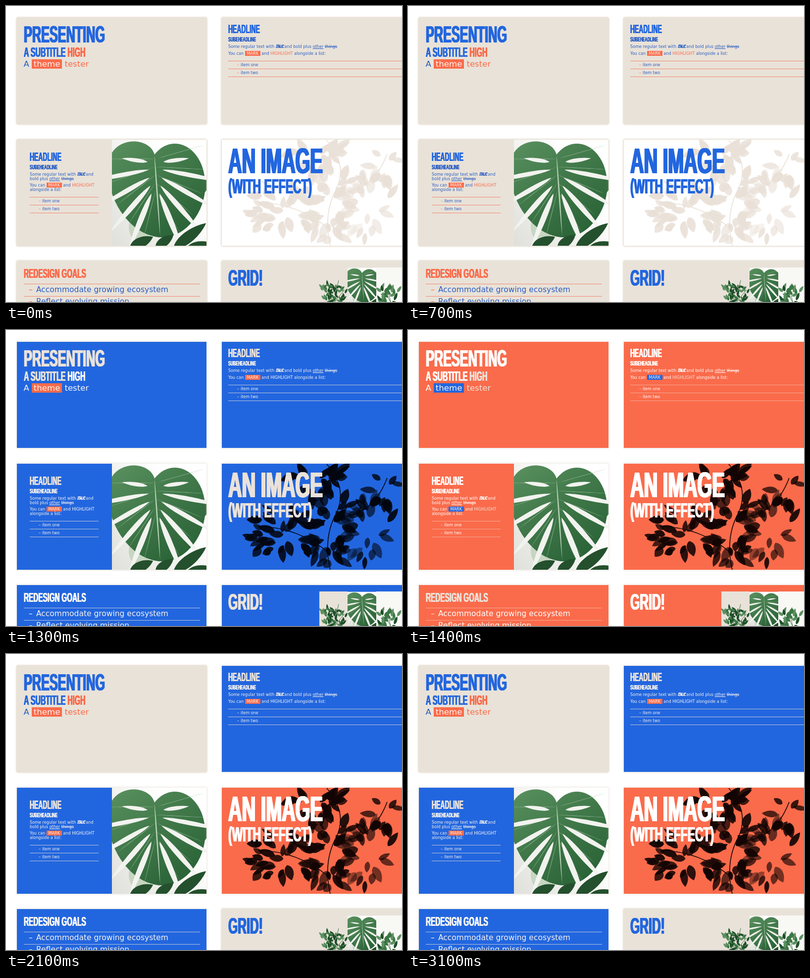
Animation, 800 px wide and 600 px high, one loop 3200 ms. Source, as an HTML page:

```html
<!DOCTYPE html>
<html lang="en">
<head>
<meta charset="utf-8">
<title>Theme tester</title>
<style>
html, body { margin: 0; width: 100%; height: 100%; overflow: hidden; background: #fff; }
body { position: relative; }
section, section > *, svg { position: absolute; }
section { left: 0; top: 0; }
svg { left: 0; top: 0; }

.beige {
  --bg: #e9e2d8; --head: #2266df; --accent: #fa6b4b; --text: #2b5fc4; --mark: #fa6b4b;
  --rule: #f08a72; --art: #fff; --leaf: #e9e0d7; --round: 3px;
  --shadow: 0 0 0 2px #ebe5dc, 0 0 4px 1px #e9e3da;
}
.blue {
  --bg: #2266df; --head: #ebe2d9; --accent: #fbf8f5; --text: #f6f1ec; --mark: #fa6b4b;
  --rule: #b9c4da; --art: #2266df; --leaf: #03060f; --round: 0;
  --shadow: 0 0 4px 1px #ebe6df;
}
.coral {
  --bg: #fa6b4b; --head: #fff; --accent: #ebe2d9; --text: #fff; --mark: #2266df;
  --rule: #f6a891; --art: #fa6b4b; --leaf: #120504; --round: 0;
  --shadow: 0 0 4px 1px #ebe6df;
}
.card { background: var(--bg); border-radius: var(--round); box-shadow: var(--shadow); }
.art { background: var(--art); }
.rule { background: var(--rule); height: 1px; }
.sprig { fill: var(--leaf); stroke: var(--leaf); }

.head, .text { white-space: pre; line-height: 1; }
.head, i {
  font-family: "Liberation Sans", Arial, sans-serif; font-weight: 700;
  transform: scaleX(.53); transform-origin: 0 0;
  text-shadow: .035em 0 currentColor, -.035em 0 currentColor;
}
.head { color: var(--head); }
.text { font-family: "DejaVu Sans", Verdana, sans-serif; color: var(--text); }
.plain { color: var(--text); }
.accent, b { color: var(--accent); }
.text b { font-weight: 400; }
i {
  display: inline-block; width: 15px; font-size: 9.4px; line-height: .8; font-style: normal;
  transform: scaleX(.53) skewX(-20deg); transform-origin: 0 100%;
}
mark { background: var(--mark); color: #fff5ee; padding: 0 3.7px; }
</style>
</head>
<body>
<script>
const LOOP = 3200;
const acts = [
  { until: 800, theme: 'beige' },
  { until: 1400, theme: 'blue' },
  { until: 2100, theme: 'coral' },
  { until: LOOP, theme: null } // every panel in its own theme
];

let seed = 11;
const random = () => (seed = (seed * 16807) % 2147483647) / 2147483647;
const between = (a, b) => a + random() * (b - a);
const repeat = (count, make) => Array.from({ length: count }, (_, i) => make(i)).join('');

const box = (cls, x, y, w, h) =>
  `<div class="${cls}" style="left:${x}px;top:${y}px;width:${w}px;height:${h}px"></div>`;
// y is the baseline; both typefaces put it .846em below the top of the line
const type = (cls, x, y, size, words) =>
  `<span class="${cls}" style="left:${x}px;top:${y - .846 * size}px;font-size:${size}px">${words}</span>`;
const head = (x, y, size, words, cls = '') => type('head ' + cls, x, y, size, words);
const text = (x, y, size, words, cls = '') => type('text ' + cls, x, y, size, words);
const rule = (x, y, w) => box('rule', x, y, w, 1);
const card = (x, y) => box('card', x, y, 383, 215);
const svg = body => `<svg width="800" height="600" viewBox="0 0 800 600">${body}</svg>`;

const leaf = (x, y, angle, length, width, attrs = '') =>
  `<path transform="translate(${x} ${y}) rotate(${angle})"
    d="M0 0C${length * .2} ${-width} ${length * .7} ${-width * .8} ${length} 0C${length * .7} ${width * .8} ${length * .2} ${width} 0 0" ${attrs}/>`;

// slits and veins fan out from the midrib, steeper towards the tip
const fan = (side, make) => repeat(5, i => make(302 + side * (16 - i * 2), 312 + i * 16, 90 - side * (98 - i * 19), i));
const bothSides = make => fan(-1, make) + fan(1, make);

const monstera = `
  <rect x="214" y="271" width="191" height="215" fill="url(#wall)"/>
  <ellipse cx="270" cy="448" rx="22" ry="30" fill="#b9cfb4" opacity=".7"/>
  ${leaf(399, 380, -78, 36, 8, 'fill="#47784c"')}
  <path fill="url(#green)" d="M300 301C290 264 214 262 206 320C200 390 252 470 318 469
    C368 467 408 410 402 352C396 284 336 256 300 301Z"/>
  ${bothSides((x, y, angle) => leaf(302, y - 2, angle - 8, 104, .7, 'fill="#a5c6a5" opacity=".8"'))}
  ${bothSides((x, y, angle, i) => leaf(x, y + 4, angle, i ? 125 : 52, 6 + i * .6, 'fill="#f2f3ef"'))}
  ${leaf(300, 303, 86, 164, 2, 'fill="#b3cfb1"')}
  <g fill="#24502d">
    ${leaf(250, 490, -25, 52, 16)}${leaf(302, 490, -35, 44, 14)}${leaf(338, 492, -38, 84, 17)}${leaf(362, 495, -12, 60, 18)}
  </g>`;

const defs = svg(`<defs>
  <linearGradient id="wall" x1="0" y1="1" x2=".8" y2=".4">
    <stop stop-color="#dfe0da"/><stop offset=".55" stop-color="#f1f2ee"/><stop offset="1" stop-color="#fff"/>
  </linearGradient>
  <linearGradient id="green" x1="0" y1="0" x2=".7" y2="1">
    <stop stop-color="#5b9160"/><stop offset=".5" stop-color="#41794a"/><stop offset="1" stop-color="#2a6337"/>
  </linearGradient>
  <clipPath id="photo"><rect x="214" y="271" width="191" height="215"/></clipPath>
  <clipPath id="artwork"><rect x="436" y="271" width="364" height="215"/></clipPath>
  <clipPath id="thumb"><rect x="690" y="530" width="58" height="70"/></clipPath>
  <g id="monstera">${monstera}</g>
</defs>`);

// a loose clump of leaves, each pointing roughly away from the middle
const clump = (cx, cy, rx, ry, count, faintest) => repeat(count, () => {
  const turn = between(0, 360), rad = turn * Math.PI / 180, reach = Math.sqrt(random());
  return leaf(cx + Math.cos(rad) * reach * rx, cy + Math.sin(rad) * reach * ry,
    turn + between(-50, 50), between(18, 36), between(7, 13), `opacity="${between(faintest, 1)}" stroke="none"`);
});
const sprig = () => `<g class="sprig" clip-path="url(#artwork)">
  <g fill="none" stroke-width="1.6">
    <path d="M655 486Q640 420 668 370Q690 320 648 272M650 450Q590 400 510 398M665 380Q740 380 770 300"/>
  </g>
  ${clump(628, 300, 44, 26, 22, .8)}
  ${clump(562, 415, 60, 48, 36, .75)}
  ${clump(655, 400, 48, 75, 44, .65)}
  ${clump(728, 405, 48, 65, 34, .4)}
  ${clump(762, 318, 18, 28, 9, .6)}
</g>`;

const plant = (cx, cy, rx, ry, count, size) => repeat(count, () =>
  leaf(cx + between(-rx, rx), cy + between(-ry, ry), between(-160, -20), between(size * .6, size), size * .24,
    `fill="${['#1f4f2a', '#3b7744', '#5d8f62'][random() * 3 | 0]}"`));

const thumbs = () => svg(`
  <rect x="633" y="530" width="57" height="70" fill="#e8e2d9"/>
  <path d="M660 600L650 562M662 600L672 556M664 600L684 575" stroke="#45734a" fill="none"/>
  ${plant(661, 585, 24, 17, 60, 13)}
  <g clip-path="url(#thumb)"><use href="#monstera" transform="translate(612.5 434.5) scale(.355)"/></g>
  <rect x="748" y="530" width="52" height="70" fill="#f8f8f5"/>
  <path d="M777 600Q770 575 776 562M777 600L764 578" stroke="#45734a" fill="none"/>
  ${plant(775, 590, 20, 16, 22, 18)}`);

// wrap is the extra line pitch of the narrow column, or 0
function notes(x, y, width, wrap) {
  const gap = wrap ? '<br>' : ' ', list = y + 56 + wrap * 2;
  const item = (row, words) =>
    text(x + 18, list + row * 16 + 11, 8, '–', 'accent') + text(x + 25, list + row * 16 + 11, 8, words);
  return head(x, y, 23.6, 'HEADLINE') + head(x, y + 16.5, 13.4, 'SUBEHEADLINE', 'plain') +
    text(x, y + 29.3, 8.15, `Some regular text with <i>ITALIC</i> and${gap}bold plus <u>other</u> <s>things</s>`) +
    text(x, y + 43 + wrap, 8.15, `You can <mark>MARK</mark> and <b>HIGHLIGHT</b>${gap}alongside a list:`) +
    repeat(3, row => rule(x, Math.floor(list + row * 15.8), width)) +
    item(0, 'item one') + item(1, 'item two');
}

const goal = (y, words) => text(46, y, 15.5, '–', 'accent') + text(61, y, 15.5, words);

const panels = [
  { own: 'beige', content: card(22, 24) +
    head(36, 74, 47.6, 'PRESENTING') +
    head(36, 103, 27.2, 'A SUBTITLE <b>HIGH</b>') +
    text(35.5, 124, 16.6, 'A <mark>theme</mark> <b>tester</b>') },

  { own: 'blue', content: card(436, 24) + notes(449, 55.5, 351, 0) },

  { own: 'blue', content: card(22, 271) +
    svg('<g clip-path="url(#photo)"><use href="#monstera"/></g>') + notes(48, 315, 139, 8.3) },

  { own: 'coral', content: card(436, 271) + box('art', 436, 271, 383, 215) + svg(sprig()) +
    head(449, 339, 72, 'AN IMAGE') + head(449, 381, 43.2, '(WITH EFFECT)') },

  { own: 'blue', content: card(22, 517) +
    head(36, 551, 26.2, 'REDESIGN GOALS', 'accent') + rule(36, 563, 356) + rule(36, 588, 356) +
    goal(581, 'Accommodate growing ecosystem') + goal(605.5, 'Reflect evolving mission') },

  { own: 'beige', content: card(436, 517) + head(449, 567, 46.6, 'GRID!') + thumbs() }
];

document.body.insertAdjacentHTML('beforeend', defs +
  panels.map(panel => `<section class="beige">${panel.content}</section>`).join(''));
const sections = [...document.querySelectorAll('section')];

function draw() {
  const time = performance.now() % LOOP;
  const { theme } = acts.find(act => time < act.until);
  sections.forEach((section, i) => { section.className = theme || panels[i].own; });
  requestAnimationFrame(draw);
}
draw();
</script>
</body>
</html>
```
